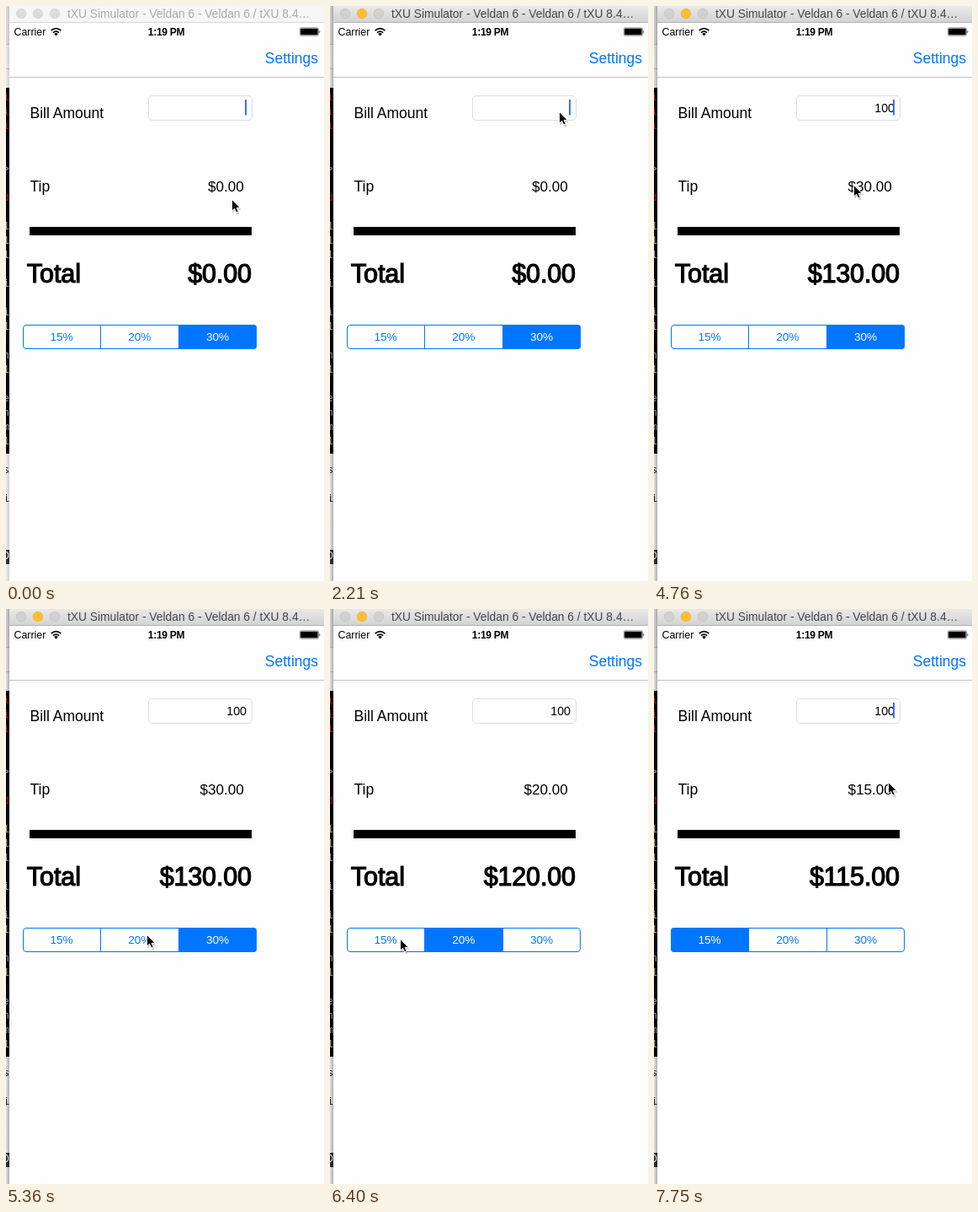
Write an HTML page that moves like this. It is 378 px wide and 682 px high and loops after 8000 ms.

```html
<!DOCTYPE html>
<html lang="en">
<head>
<meta charset="utf-8">
<title>Tip calculator</title>
<style>
  html, body { margin: 0; width: 100%; height: 100%; overflow: hidden; background: #fff; }
  svg { display: block; width: 100vw; height: 100vh; }
  text { font-family: "Liberation Sans", Arial, sans-serif; white-space: pre; }
  .label { font-size: 17.5px; }
  .money { font-size: 17.1px; text-anchor: end; }
  .big { font-size: 30.5px; stroke: #000; stroke-width: 1.2px; }
  .seg { font-size: 13.6px; text-anchor: middle; }
  .mono { font: 12.5px "Liberation Mono", monospace; }
</style>
</head>
<body>
<svg viewBox="0 0 378 682" preserveAspectRatio="none">
  <defs>
    <linearGradient id="barOn" x2="0" y2="1">
      <stop stop-color="#e9e9e9"/><stop offset="1" stop-color="#d2d2d2"/>
    </linearGradient>
    <linearGradient id="shade">
      <stop stop-color="#000" stop-opacity=".08"/><stop offset="1" stop-color="#000" stop-opacity=".28"/>
    </linearGradient>
    <clipPath id="edge"><rect width="4" height="682"/></clipPath>
    <clipPath id="pill"><rect x="20" y="378" width="278" height="29" rx="4"/></clipPath>
  </defs>

  <g id="behind" clip-path="url(#edge)">
    <rect width="4" height="682" fill="#f3f3f3"/>
    <rect width="4" height="45" fill="#e6e6e6"/>
    <path d="M0 45.5H4M0 74.5H4" stroke="#c4c4c4"/>
    <rect y="97" width="4" height="434" fill="#000"/>
    <rect y="645" width="4" height="17" fill="#333"/>
  </g>
  <rect id="shadow" width="4" height="682" fill="url(#shade)"/>

  <rect x="4" width="374" height="682" fill="#fefefe"/>
  <rect id="bar" x="4" width="374" height="20"/>
  <path id="rule" d="M4 19.5H378"/>
  <g id="lights" stroke-width=".6"></g>
  <text id="title" x="73" y="14" font-size="13.8">tXU Simulator - Veldan 6 - Veldan 6 / tXU 8.4…</text>

  <text x="9.5" y="35" font-size="12.4">Carrier</text>
  <path d="M53.6 29.2Q59.5 24.2 65.4 29.2M55.9 31.6Q59.5 28.6 63.1 31.6" fill="none" stroke="#000" stroke-width="1.7"/>
  <path d="M57.2 33L59.5 35.4L61.8 33Q59.5 31.2 57.2 33Z"/>
  <text x="190.5" y="35" font-size="12" font-weight="bold" letter-spacing="-.3" text-anchor="middle">1:19 PM</text>
  <rect x="349.4" y="25.9" width="22" height="9.2" rx="1.6" fill="none" stroke="#000" stroke-width=".5"/>
  <rect x="350.2" y="26.7" width="20.4" height="7.6" rx="1"/>
  <path d="M372.5 28.7Q374.3 30.5 372.5 32.4Z"/>
  <text x="371" y="68" font-size="17.5" fill="#0076ff" text-anchor="end">Settings</text>
  <path d="M4 84.5H378" stroke="#c2c2c2"/>

  <text class="label" x="28.5" y="133">Bill Amount</text>
  <rect x="169.5" y="106.5" width="123" height="29" rx="4.5" fill="#fefefe" stroke="#dedede"/>
  <text id="bill" x="286" y="126" font-size="14.2" text-anchor="end"></text>
  <rect id="caret" x="284" y="111" width="2" height="18.5" fill="#426bf2"/>
  <text class="label" x="28.5" y="219.7">Tip</text>
  <text id="tip" class="money" x="282.8" y="219.7"></text>
  <rect x="28" y="262" width="264" height="10"/>
  <text class="big" x="24.7" y="327.5">Total</text>
  <text id="total" class="big" x="291.7" y="327.5" letter-spacing="-.2" text-anchor="end"></text>

  <g id="segs" clip-path="url(#pill)"></g>
  <path d="M112.5 378V407M205.5 378V407" stroke="#0076ff"/>
  <rect x="20.5" y="378.5" width="277" height="28" rx="3.5" fill="none" stroke="#0076ff"/>

  <g id="mouse">
    <path d="M.5 1.5V15.5L4 12.3L6.2 17L8.8 16L6.7 11.3H11Z" opacity=".22" transform="translate(.7 1.2)"/>
    <path d="M.5 .5V14L3.6 11.2L5.8 16L8.2 15L6.1 10.3H10.3Z" stroke="#fff"/>
  </g>
</svg>
<script>
const LOOP = 8000, STEP = 150, ACTIVE = 2210;
const $ = id => document.getElementById(id);

function add(parent, tag, attrs, text = "") {
  const el = document.createElementNS("http://www.w3.org/2000/svg", tag);
  set(el, attrs);
  el.textContent = text;
  return parent.appendChild(el);
}
function set(el, attrs) {
  for (const k in attrs) el.setAttribute(k, attrs[k]);
}

// Sliver of the terminal behind the window, one character per row
function rowColor(c, i) {
  if (i > 30) return "#fff";
  if (i > 25) return "#222";
  if (i < 8 && c !== ">") return "#c21a10";
  return c === "1" ? "#c9b48a" : "#aab4c0";
}
[..."iii  > d 11l i i1 n1 enm1 s i   D"].forEach((c, i) =>
  add($("behind"), "text", { class: "mono", x: -3.5, y: 112 + 17 * i, fill: rowColor(c, i) }, c));

const lights = [18, 38, 58].map(cx => add($("lights"), "circle", { cx, cy: 9, r: 5.8 }));

const RATES = [.15, .2, .3];
const segs = RATES.map((r, i) => ({
  box: add($("segs"), "rect", { x: 20 + i * 92.7, y: 378, width: 92.7, height: 29 }),
  text: add($("segs"), "text", { class: "seg", x: 66 + i * 92.8, y: 397 }, Math.round(r * 100) + "%")
}));

const KEYS = [2810, 3260, 3410];
const TAPS = [{ at: 5500, seg: 1 }, { at: 6550, seg: 0 }];
const REST = { x: 268, y: 229 };
const MOVES = [
  { from: 730, to: 1480, x: 272, y: 125, sag: 0 },
  { from: 4380, to: 5360, x: 167, y: 386, sag: 0 },
  { from: 5650, to: 6400, x: 83, y: 391, sag: 12 },
  { from: 7300, to: 7750, x: 278, y: 205, sag: 0 }
];

const clamp = v => Math.min(1, Math.max(0, v));
const smooth = p => p * p * (3 - 2 * p);
const tint = a => `rgb(${255 * a},${118 + 137 * a},255)`;

// The pointer eases along each move but is only sampled every STEP
function pointer(t) {
  return MOVES.reduce((pos, m) => {
    const tick = m.to - Math.ceil((m.to - t) / STEP) * STEP;
    const p = clamp((tick - m.from) / (m.to - m.from)), e = smooth(p);
    return {
      x: pos.x + (m.x - pos.x) * e,
      y: pos.y + (m.y - pos.y) * e + m.sag * Math.sin(Math.PI * p)
    };
  }, REST);
}

// Blinks once a second, stays lit while typing
function caretAlpha(t) {
  const typed = t >= KEYS[0];
  if (typed && t < 4010) return 1;
  const phase = (t + (typed ? 990 : 700)) % 1000;
  if (phase >= 600) return 1;
  return phase < STEP || phase >= 450 ? .5 : 0;
}

// Selected segment and how far each one is filled
function selection(t) {
  let pick = 2, fill = [0, 0, 1];
  for (const { at, seg } of TAPS) {
    if (t < at) break;
    const k = Math.min(2, Math.floor((t - at) / STEP));
    fill = fill.map(a => a * [1, .33, 0][k]);
    fill[seg] = [.2, .75, 1][k];
    if (k) pick = seg;
  }
  return { rate: RATES[pick], fill };
}

function drawWindow(on) {
  set($("bar"), { fill: on ? "url(#barOn)" : "#f6f6f6" });
  set($("rule"), { stroke: on ? "#b4b4b4" : "#d6d6d6" });
  set($("title"), { fill: on ? "#464646" : "#aaa" });
  set($("shadow"), { opacity: on ? 1 : .5 });
  lights.forEach((c, i) => set(c, on && i === 1
    ? { fill: "#ffbd2e", stroke: "#e6a935" }
    : { fill: on ? "#d0d0d0" : "#dcdcdc", stroke: on ? "#bcbcbc" : "#d0d0d0" }));
}

function draw(t) {
  const bill = "100".slice(0, KEYS.filter(k => k <= t).length);
  const { rate, fill } = selection(t), { x, y } = pointer(t);
  drawWindow(t >= ACTIVE);
  $("bill").textContent = bill;
  $("tip").textContent = "$" + (bill * rate).toFixed(2);
  $("total").textContent = "$" + (bill * (1 + rate)).toFixed(2);
  set($("caret"), { opacity: caretAlpha(t) });
  set($("mouse"), { transform: `translate(${Math.round(x)} ${Math.round(y)})` });
  fill.forEach((a, i) => {
    set(segs[i].box, { fill: tint(1 - a) });
    set(segs[i].text, { fill: tint(a) });
  });
}

const start = performance.now();
function tick() {
  draw((performance.now() - start) % LOOP);
  requestAnimationFrame(tick);
}
tick();
</script>
</body>
</html>
```
